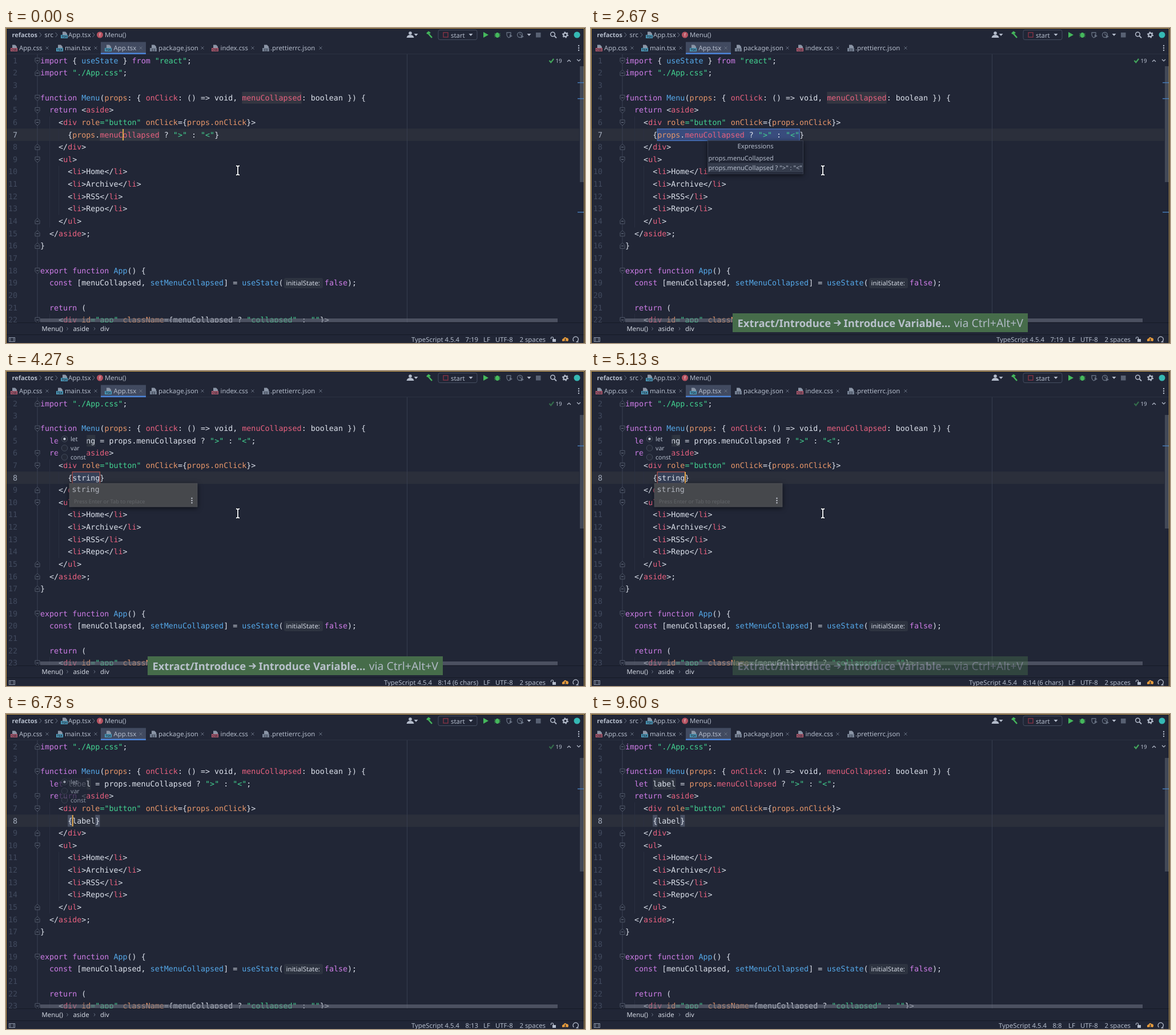
Write an HTML page that moves like this. It is 1014 px wide and 552 px high and loops after 9670 ms.

```html
<!DOCTYPE html>
<html lang="en">
<head>
<meta charset="utf-8">
<title>Introduce variable</title>
<style>
  html, body { margin: 0; width: 100%; height: 100%; overflow: hidden; background: #212636; }
  svg { display: block; width: 100vw; height: 100vh; }
  text { white-space: pre; text-rendering: geometricPrecision; font: 11.35px "Noto Sans", "Open Sans", sans-serif; fill: #b4bccb; }
  .m { font: 13.34px "DejaVu Sans Mono", "Noto Sans Mono", monospace; fill: #dde2ec; font-variant-ligatures: none; }
  .k { fill: #cf7de8; }
  .f { fill: #55a9ea; }
  .s { fill: #43d391; }
  .p { fill: #e8976a; }
  .r { fill: #e8617f; }
  .n { fill: #414a5e; }
  .now { fill: #a4adbd; }
  .light { fill: #d3d8e2; }
  .soft { filter: drop-shadow(0 2px 4px #0009); }
</style>
</head>
<body>
<svg id="stage" viewBox="0 0 1014 552"></svg>
<script>
const LOOP = 9670, X0 = 60, PITCH = 8.03, TOP = 57.3, ROW = 21.64;
const REFACTOR = 3500, TYPING = 5400, ENTER = 6720, RECOLOR = 7300;

const rowY = r => TOP + ROW * r;
const colX = c => X0 + PITCH * c;
const esc = s => s.replace(/&/g, '&amp;').replace(/</g, '&lt;');
const rect = (x, y, w, h, fill, extra = '') =>
  `<rect x="${x}" y="${y}" width="${w}" height="${h}" fill="${fill}" ${extra}/>`;
const path = (d, stroke, w = 1, fill = 'none') =>
  `<path d="${d}" stroke="${stroke}" stroke-width="${w}" fill="${fill}"/>`;
const text = (x, y, s, extra = '') => `<text x="${x}" y="${y}" ${extra}>${esc(s)}</text>`;
const during = (spans, body) => `<g data-on="${spans}">${body}</g>`;
const fade = (keys, body, extra = '') => `<g data-fade="${keys}" ${extra}>${body}</g>`;
const at = (x, y, body) => `<g transform="translate(${x} ${y})">${body}</g>`;

// Segments are split by "|"; a leading letter and colon picks the colour.
function code(r, src) {
  let col = 0;
  return src.split('|').map(part => {
    const [, cls = '', body] = /^(?:([kfspr]):)?(.*)$/.exec(part);
    const out = body.trim() ? text(colX(col), rowY(r) + 4.4, body, `class="m ${cls}"`) : '';
    col += body.length;
    return out;
  }).join('');
}
const mark = (r, col, len, fill, extra) =>
  rect(colX(col), rowY(r) - 10.3, PITCH * len, 20.6, fill, extra);
const caret = col => rect(colX(col) - .3, 177, 1.8, 20, '#f0b04a');

function fold(r, up) {
  const s = up ? -1 : 1;
  return at(55, rowY(r), path(`M-4 ${-4.5 * s}h8v${6 * s}l-4 ${4 * s}l-4 ${-4 * s}z`, '#505869', 1, '#212636')
    + path('M-2 0h4', '#737c8e'));
}
const folds = (down, up) => down.map(r => fold(r)).join('') + up.map(r => fold(r, true)).join('');
const numbers = first => Array.from({ length: 22 }, (_, r) =>
  text(20, rowY(r) + 4.4, String(r + first), `text-anchor="end" class="m ${r === 6 ? 'now' : 'n'}"`)).join('');

const li = s => `      <|r:li|>${s}</|r:li|>`;
const menuHead = 'k:function| |f:Menu|(|p:props|: { |r:onClick|: () => void, |r:menuCollapsed|: boolean }) {';
const cssImport = 'k:import| |s:"./App.css"|;';
const shared = {
  4: '  |k:return| <|r:aside|>',
  5: '    <|r:div| |p:role|s:="button"| |p:onClick|=|{|p:props.onClick|}>',
  7: '    </|r:div|>',
  8: '    <|r:ul|>',
  9: li('Home'), 10: li('Archive'), 11: li('RSS'), 12: li('Repo'),
  13: '    </|r:ul|>',
  14: '  </|r:aside|>;',
  15: '}',
  17: 'k:export function| |f:App|() {',
  18: '  |k:const| [menuCollapsed, |f:setMenuCollapsed|] = |f:useState|(         |k:false|);',
  20: '  |k:return| (',
  21: '    <|r:div| |p:id|s:="app"| |p:className|=|{menuCollapsed ? |s:"collapsed"| : |s:""|}>'
};

const words = [[REFACTOR, 'string'], [TYPING, 'l'], [5530, 'la'], [5670, 'lab'], [6070, 'labe'], [6200, 'label']];
const wordSpans = words.map(([from, word], i) => [from, i < 5 ? words[i + 1][0] : LOOP, word]);

function before() {
  const sel = 'stroke="#4c80d6"';
  return during(`0-${REFACTOR}`,
    mark(3, 44, 13, '#343641') + mark(6, 13, 13, '#363b46')
    + during('330-2670', mark(6, 7, 19, '#394c7d', sel))
    + during(`2670-${REFACTOR}`, mark(6, 7, 31, '#394c7d', sel))
    + numbers(1) + folds([0, 3], [1])
    + code(0, 'k:import| { |f:useState| } |k:from| |s:"react"|;') + code(1, cssImport) + code(3, menuHead)
    + code(6, '      {|p:props|.|r:menuCollapsed| ? |s:">"| : |s:"<"|}')
    + during('0-800', caret(18)));
}

function after() {
  const tail = ' ? |s:">"| : |s:"<"|;';
  const edits = wordSpans.map(([a, b, w], i) => {
    const head = `  |k:let| ${w} = `;
    const plain = code(3, head + 'props.menuCollapsed' + tail);
    const tinted = code(3, head + '|p:props|.|r:menuCollapsed|' + tail);
    const field = mark(6, 7, w.length, i ? 'none' : '#374158', 'stroke="#d0574d"');
    const braces = mark(6, 6, 1, '#4a5163') + mark(6, 7 + w.length, 1, '#4a5163');
    return during(`${a}-${b}`, mark(3, 6, w.length, '#2f3540')
      + during(`0-${RECOLOR}`, plain) + during(`${RECOLOR}-${LOOP}`, tinted)
      + during(`0-${ENTER}`, field) + during(`${ENTER}-${LOOP}`, braces)
      + code(6, `      {${w}}`)
      + during(i ? `0-${ENTER}` : `0-4070,4600-${TYPING}`, caret(7 + w.length)));
  }).join('');
  return during(`${REFACTOR}-${LOOP}`, numbers(2) + folds([2], [0])
    + code(0, cssImport) + code(2, menuHead) + edits
    + during(`${ENTER}-8530,9070-9600`, caret(7)));
}

function editor() {
  const guide = (c, a, b) => rect(Math.round(colX(c)), rowY(a) - 10.8, 1, ROW * (b - a + 1), '#2a3041');
  return `<clipPath id="pane"><rect y="46" width="1014" height="470"/></clipPath><g clip-path="url(#pane)">`
    + rect(0, 176.3, 1004, 21.6, '#2b2f3b') + rect(702, 46, 1, 470, '#363d4e') + rect(54.5, 46, 1, 470, '#3a4152')
    + guide(2, 5, 13) + guide(4, 6, 6) + guide(4, 9, 12) + guide(2, 21, 21)
    + folds([4, 5, 8, 17, 21], [7, 13, 14, 15])
    + before() + after()
    + Object.entries(shared).map(([r, s]) => code(+r, s)).join('')
    + rect(487, 438, 68, 18, '#2d3340', 'rx="3"') + text(490.5, 451, 'initialState:', 'class="light"')
    + rect(60, 509, 906, 6.5, '#6b7180', 'opacity=".58"') + '</g>'
    + during(`0-${REFACTOR}`, rect(1005, 67, 7, 203, '#434957')
      + [95, 123, 322].map(y => rect(1001, y, 11, 1.5, '#4579b4')).join(''))
    + during(`${REFACTOR}-${LOOP}`, rect(1005, 77, 7, 199, '#434957') + rect(1001, 130.5, 11, 1.5, '#4579b4'))
    + fade('0:1 3599:1 3600:.55 7799:.55 7800:1', path('M951.5 57l2.8 3.3l4.8-6.3', '#43a55c', 2.2))
    + text(962.5, 60.5, '19', 'style="font-size:9.8px"')
    + path('M983 59l3-3l3 3M1000 55l3 3l3-3', '#b4bccb', 1.2);
}

const file = (x, y, color, tag) => at(x, y,
  path('M-3 -5.5h5l3 3v3h-8z', 'none', 0, '#8b95a6') + rect(-6, 0, 12, 6, color)
  + text(0, 5, tag, 'text-anchor="middle" style="font-size:5.4px;font-weight:700;fill:#202534"'));
const chevron = (x, y, h = 4) => path(`M${x - 1.5} ${y - h}l${h - .5} ${h}l${.5 - h} ${h}`, '#6b7486');
const arrow = (x, y) => path(`M${x - 3.5} ${y - 2}h7l-3.5 4z`, 'none', 0, '#b4bccb');

function toolbar() {
  const grey = '#667081', green = '#45b85c', light = '#b4bccb';
  return rect(0, 0, 1014, 24, '#212636')
    + text(10.5, 16, 'refactos', 'style="font-weight:700;font-size:10.9px"') + chevron(60, 12)
    + text(67.5, 16, 'src') + chevron(88, 12) + file(102, 12, '#4c9dbd', 'TSX') + text(109, 16, 'App.tsx') + chevron(153, 12)
    + '<circle cx="164.5" cy="12" r="5.5" fill="#b75361"/>'
    + text(164.5, 15, 'f', 'text-anchor="middle" style="font-size:8px;fill:#e8dce2"') + text(173, 16, 'Menu()')
    + `<circle cx="708" cy="9" r="2.8" fill="${light}"/>` + path('M701.5 17q1-5 6.5-5t6.5 5z', 'none', 0, light) + arrow(718, 12)
    + path('M737 10l3-3l3 2M739 9l7 8', green, 2.5)
    + rect(757, 3.5, 68, 17, 'none', 'stroke="#454d60" rx="3"') + rect(766, 8, 8, 8, 'none', 'stroke="#8d3445" stroke-width="1.3"')
    + text(779, 16.5, 'start') + arrow(814, 12)
    + path('M836 7l9 5l-9 5z', 'none', 0, green)
    + at(860.5, 12.5, '<ellipse rx="3.4" ry="4.5" fill="#45b85c"/>' + path('M-5 -3l10 6M5 -3l-10 6M-5.5 0h11', green))
    + path('M877 8h7v3q0 4-3.5 6q-3.5-2-3.5-6z', grey, 1.3) + path('M882 11l5 3l-5 3z', 'none', 0, grey)
    + '<circle cx="900" cy="12" r="4.5" fill="none" stroke="#667081" stroke-width="1.3"/>'
    + path('M900 9v3h3', grey) + path('M902 12l5 3l-5 3z', 'none', 0, grey) + arrow(916, 12)
    + rect(928, 8, 8.5, 8.5, '#586173')
    + `<circle cx="957.5" cy="11" r="3.8" fill="none" stroke="${light}" stroke-width="1.5"/>` + path('M960.5 14l3.5 3.5', light, 1.8)
    + `<circle cx="979.5" cy="12" r="3.2" fill="none" stroke="${light}" stroke-width="2.2"/>`
    + `<circle cx="979.5" cy="12" r="4.8" fill="none" stroke="${light}" stroke-width="1.6" stroke-dasharray="2.2 2.83"/>`
    + '<circle cx="1000" cy="12" r="5.5" fill="#35b9b4"/>';
}

function tabs() {
  const list = [[14, 23, 72, 'App.css'], [94, 103, 157, 'main.tsx'], [179, 188.5, 236, 'App.tsx'],
    [258, 267, 344, 'package.json'], [366, 375.5, 432, 'index.css'], [455, 463, 551, '.prettierrc.json']];
  const types = { css: ['#b1596d', 'CSS'], tsx: ['#4c9dbd', 'TSX'], json: ['#737e90', '{ }'] };
  return rect(0, 24, 1014, 22, '#212636') + rect(0, 45, 1014, 1, '#2b3142')
    + rect(166, 24.5, 79, 21, '#414a60') + rect(166, 43.5, 79, 2.5, '#4c83d8')
    + list.map(([icon, x, close, name]) => file(icon, 35, ...types[name.split('.').pop()]) + text(x, 39, name)
      + path(`M${close - 2.5} 32.5l5 5m0 -5l-5 5`, '#667081')).join('')
    + [31, 35, 39].map(y => `<circle cx="1003" cy="${y}" r="1.2" fill="#b4bccb"/>`).join('');
}

function footer() {
  const place = (from, to, x, pos) => during(`${from}-${to}`, text(x, 549.5, 'TypeScript 4.5.4') + text(x + 94.5, 549.5, pos));
  const typed = wordSpans.slice(1).map(([a, b, w]) => {
    const col = 8 + w.length;
    return place(a, b === LOOP ? 6800 : b, col > 9 ? 710 : 714, '8:' + col);
  }).join('');
  return rect(0, 516, 1014, 36, '#212636') + rect(0, 516, 1014, 1, '#161a26') + rect(0, 537, 1014, 1, '#161a26')
    + text(62.5, 531, 'Menu()', 'class="light"') + chevron(108, 527, 2.5)
    + text(117.5, 531, 'aside', 'class="light"') + chevron(155.5, 527, 2.5) + text(165, 531, 'div', 'class="light"')
    + rect(5.5, 542.5, 10, 7, 'none', 'stroke="#8a94a6"') + path('M8 543v6M13 543v6', '#8a94a6')
    + place(0, 3600, 710, '7:19') + place(3600, TYPING, 662, '8:14 (6 chars)') + typed + place(6800, LOOP, 714, '8:8')
    + text(836, 549.5, 'LF') + text(857, 549.5, 'UTF-8') + text(899.5, 549.5, '2 spaces')
    + rect(957, 545, 6, 5, '#b4bccb') + path('M954.5 545v-1.5q0-2 2-2t2 2v2', '#b4bccb', 1.2)
    + path('M974.5 549q-2-4 2-5q2-4 5-1q4 0 3.5 4l-1 2z', 'none', 0, '#e49a3c') + path('M979.5 544v7m-2.5-2.5l2.5 2.5l2.5-2.5', '#252a3a', 1.4)
    + path('M994.5 549a4.7 4.7 0 1 1 4 1.2h4', '#b4bccb', 1.3);
}

function expressions() {
  const size = 'style="font-size:11.1px"';
  return during(`330-${REFACTOR}`, fade('330:.4 470:1', rect(204.5, 197.5, 167, 58, '#202534', 'stroke="#383f50"')
    + text(288, 211, 'Expressions', 'text-anchor="middle"')
    + during('0-2670', rect(205, 219.5, 166, 16.5, '#353c4c')) + during(`2670-${REFACTOR}`, rect(205, 236.5, 166, 16.5, '#353c4c'))
    + text(205.5, 232, 'props.menuCollapsed', size) + text(205.5, 248.7, 'props.menuCollapsed ? ">" : "<"', size), 'class="soft"'));
}

function lookup() {
  return during(`${REFACTOR}-${TYPING}`, '<g class="soft">' + rect(111, 197, 224, 41, '#46484c', 'stroke="#55585d" stroke-width=".7"')
    + text(115.6, 212.3, 'string', 'class="m" style="fill:#b0b4bc"')
    + text(119, 231.5, 'Press Enter or Tab to replace', 'style="font-size:9.3px;fill:#626569"')
    + [223, 227, 231].map(y => `<circle cx="325.5" cy="${y}" r="1.2" fill="#c2c6ce"/>`).join('') + '</g>');
}

function kinds() {
  const option = (name, i) => {
    const y = 119 + 16 * i;
    return `<circle cx="102.5" cy="${y}" r="5.3" fill="#252a38" stroke="#444c5c"/>`
      + (i ? '' : `<circle cx="102.5" cy="${y}" r="2.2" fill="#c2c9d5"/>`)
      + text(113, y + 4, name, 'style="font-size:10.6px"');
  };
  return fade('3600:0 4130:1 6700:1 6730:.72 7070:0', rect(92, 108, 49, 52, '#212636')
    + ['let', 'var', 'const'].map(option).join(''), 'style="filter:drop-shadow(0 1px 2px #212636)"');
}

function balloon() {
  const bold = 'style="font-weight:700;font-size:18.4px;fill:#b9c1cc"';
  return fade('1069:0 1070:.45 1670:1 5110:1 5130:.45 5870:0', rect(248, 500, 517, 33, '#466c4a')
    + text(256.5, 523.5, 'Extract/Introduce', bold) + path('M425.5 517h11m-4.5-4.5l4.5 4.5l-4.5 4.5', '#b9c1cc', 2.2)
    + text(442.5, 523.5, 'Introduce Variable…', bold)
    + text(757, 523.5, 'via Ctrl+Alt+V', 'text-anchor="end" style="font-size:19.4px;fill:#b0b9c4"'));
}

function pointer() {
  const d = 'M403 241.5q3 0 3 2q0-2 3-2M406 243v13M403 257.5q3 0 3-2q0 2 3 2';
  return during(`0-${TYPING}`, path(d, '#10131c', 4) + path(d, '#f2f4f8', 1.9));
}

const stage = document.getElementById('stage');
stage.innerHTML = rect(0, 0, 1014, 552, '#212636') + editor() + toolbar() + tabs() + footer()
  + expressions() + lookup() + kinds() + balloon() + pointer()
  + path('M.5 552V.5H1012.5V552', '#c39a4a');

const pairs = (s, gap, mid) => s.split(gap).map(p => p.split(mid).map(Number));
const shown = [...stage.querySelectorAll('[data-on]')].map(el => [el, pairs(el.dataset.on, ',', '-')]);
const faded = [...stage.querySelectorAll('[data-fade]')].map(el => [el, pairs(el.dataset.fade, ' ', ':')]);

function valueAt(keys, t) {
  const i = keys.findIndex(k => k[0] > t);
  if (i === 0) return keys[0][1];
  if (i < 0) return keys[keys.length - 1][1];
  const [a, va] = keys[i - 1], [b, vb] = keys[i];
  return va + (vb - va) * (t - a) / (b - a);
}

function draw() {
  const t = performance.now() % LOOP;
  for (const [el, spans] of shown) el.style.display = spans.some(([a, b]) => t >= a && t < b) ? '' : 'none';
  for (const [el, keys] of faded) el.style.opacity = valueAt(keys, t);
  requestAnimationFrame(draw);
}
draw();
</script>
</body>
</html>
```
